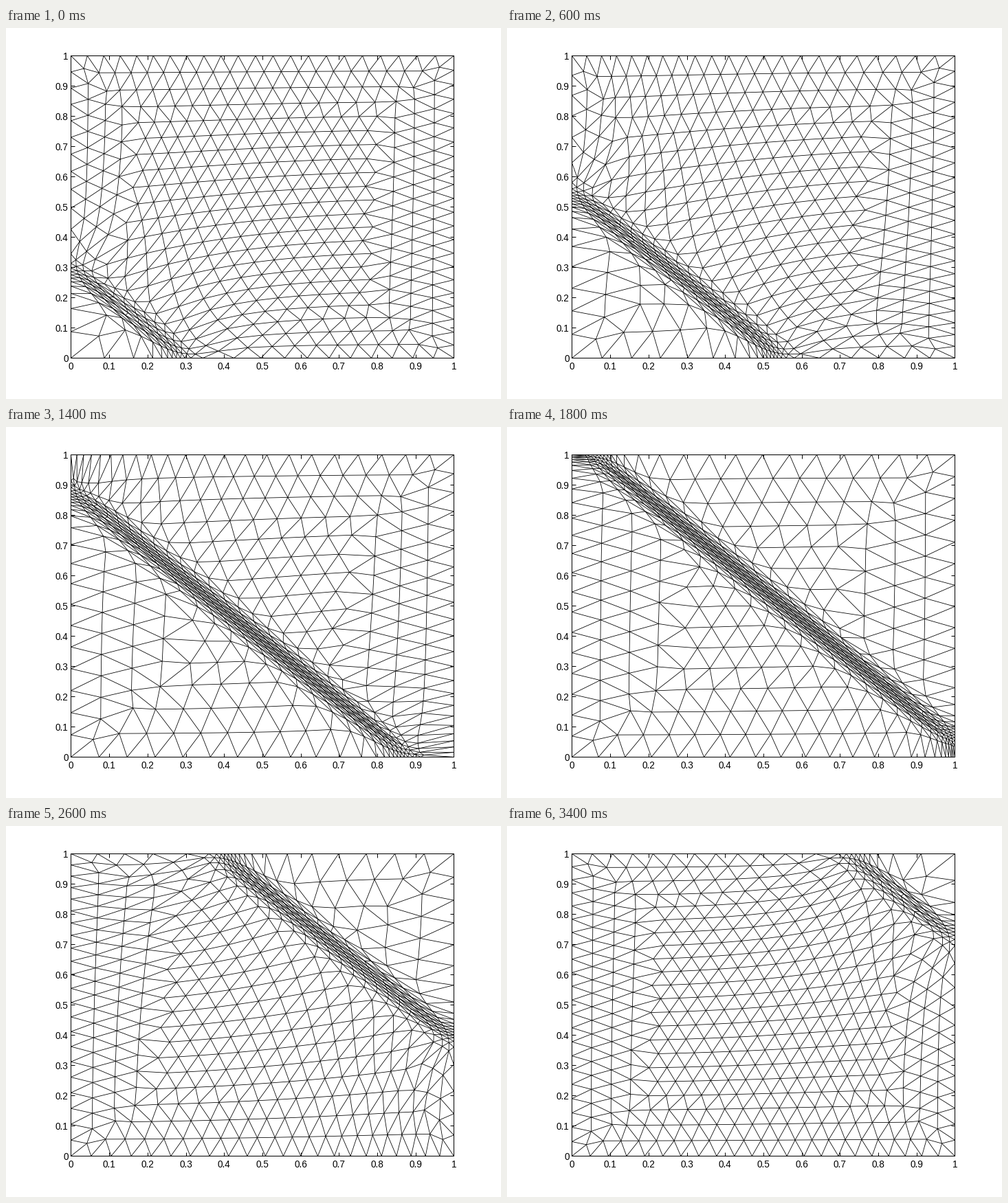
A matplotlib script for the animation above (3500 ms loop, 720 px wide and 540 px high).

```python
import matplotlib.pyplot as plt
import numpy as np
from matplotlib.animation import FuncAnimation
from matplotlib.collections import LineCollection
from matplotlib.tri import Triangulation

W, H, DPI = 720, 540, 100
FRAMES, INTERVAL = 35, 100
LEFT, RIGHT, TOP, BOTTOM = 94.4, 651.4, 40.4, 480.4
PX = 72 / DPI

SEGMENTS = 22
START, SPEED = 0.30, 0.0418   # front is the line x + y = START + SPEED * i
NU = 0.011                    # viscosity, sets the front width
CELLS = 110                   # background grid for the mesh map
grid = np.linspace(0, 1, CELLS + 1)


def ring(inset, corner, stations):
    """Points on a square ring: four corners plus stations on each side."""
    pts = [(a, b) for a in (corner, 1 - corner) for b in (corner, 1 - corner)]
    for s in stations:
        pts += [(s, inset), (s, 1 - inset), (inset, s), (1 - inset, s)]
    return pts


def logical_points():
    pts = ring(0, 0, np.arange(1, SEGMENTS) / SEGMENTS)
    pts += ring(0.048, 0.036, np.linspace(0.078, 0.922, 20))
    pts += ring(0.097, 0.100, np.arange(3, SEGMENTS - 2) / SEGMENTS)
    pts += ring(0.145, 0.143, np.linspace(0.195, 0.805, 14))
    for k, y in enumerate(np.linspace(0.145, 0.855, 17)[1:-1]):
        margin, count = (0.212, 14) if k % 2 else (0.190, 15)
        pts += [(x, y) for x in np.linspace(margin, 1 - margin, count)]
    return np.array(pts)


def conductance(front):
    """1 / mean arc-length monitor over each grid step along x + y."""
    sub = (np.arange(8) + 0.5) / 8
    s = (np.arange(2 * CELLS)[:, None] + sub) / CELLS
    slope = np.sqrt(2) / (8 * NU) / np.cosh((s - front) / (4 * NU)) ** 2
    return 1 / np.sqrt(1 + slope ** 2).mean(axis=1)


def potential(front):
    """Solve div(grad xi / w) = 0 with xi = 0 on the left and 1 on the right."""
    cond = conductance(front)
    edge = np.ones(CELLS + 1)
    edge[[0, -1]] = 0.5
    across = [cond[i:i + CELLS + 1] * edge for i in range(CELLS)]
    transfer = [None]
    for i in range(1, CELLS):
        up = cond[i:i + CELLS]
        diag = across[i - 1] + across[i]
        diag[:-1] += up
        diag[1:] += up
        S = np.diag(diag) - np.diag(up, 1) - np.diag(up, -1)
        if i > 1:
            S -= across[i - 1][:, None] * transfer[-1]
        transfer.append(np.linalg.inv(S) * across[i])
    xi = np.zeros((CELLS + 1, CELLS + 1))
    xi[-1] = 1
    for i in range(CELLS - 1, 0, -1):
        xi[i] = transfer[i] @ xi[i + 1]
    return xi


def physical_points(front):
    """Invert the map: follow each xi level line up to the wanted eta."""
    xi = potential(front)
    eta = xi.T
    level_x = np.array([np.interp(logical[:, 0], xi[:, j], grid)
                        for j in range(CELLS + 1)])
    level_eta = np.array([np.interp(level_x[j], grid, eta[:, j])
                          for j in range(CELLS + 1)])
    pos = np.empty_like(logical)
    for p, wanted in enumerate(logical[:, 1]):
        pos[p, 1] = np.interp(wanted, level_eta[:, p], grid)
        pos[p, 0] = np.interp(pos[p, 1], grid, level_x[:, p])
    return pos


logical = logical_points()
edges = Triangulation(logical[:, 0], logical[:, 1]).edges
states = [physical_points(START + SPEED * i) for i in range(FRAMES)]

plt.rcParams["font.family"] = "Liberation Sans"
fig = plt.figure(figsize=(W / DPI, H / DPI), dpi=DPI, facecolor="white")
ax = fig.add_axes([LEFT / W, 1 - BOTTOM / H, (RIGHT - LEFT) / W, (BOTTOM - TOP) / H])
ax.set_xlim(0, 1)
ax.set_ylim(0, 1)
ticks = np.arange(11) / 10
labels = [f"{t:g}" for t in ticks]
ax.set_xticks(ticks, labels)
ax.set_yticks(ticks, labels)
ax.tick_params(direction="in", top=True, right=True, length=5.5 * PX,
               width=PX, labelsize=13.6 * PX)
ax.tick_params(axis="x", pad=4.2)
ax.tick_params(axis="y", pad=2.7)
for spine in ax.spines.values():
    spine.set_linewidth(PX)

lines = LineCollection(states[0][edges], colors="black", linewidths=0.8 * PX)
ax.add_collection(lines, autolim=False)


def update(i):
    lines.set_segments(states[i][edges])
    return (lines,)


anim = FuncAnimation(fig, update, frames=FRAMES, interval=INTERVAL,
                     repeat=True, repeat_delay=0, blit=False)
plt.show()
```
